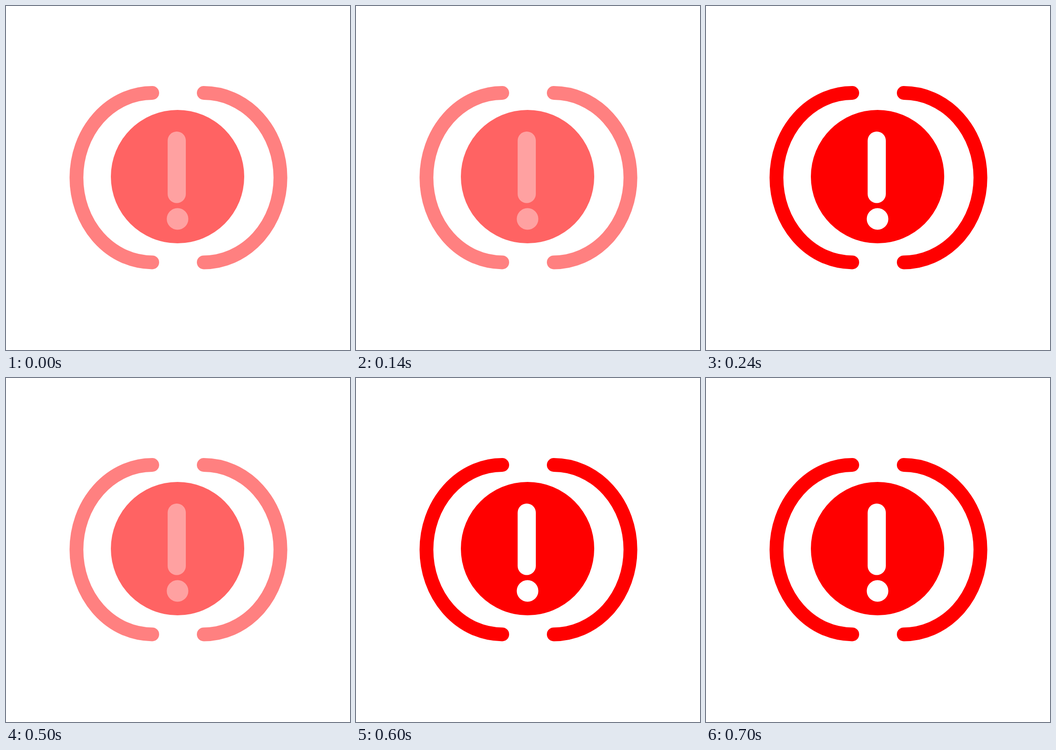
Write an HTML page that moves like this. It is 748x748 px and loops after 0.76 s.

```html
<!DOCTYPE html>
<html lang="en">
<head>
<meta charset="utf-8">
<title>Blinking warning light</title>
<style>
  html, body { margin: 0; width: 100%; height: 100%; overflow: hidden; background: #fff; }
  svg { display: block; width: 100%; height: 100%; }
  .arc { fill: none; stroke-width: 30; stroke-linecap: round; }
</style>
</head>
<body>
<svg viewBox="0 0 748 748">
  <g id="arcs" class="arc">
    <path d="M318 189A164.8 184.2 0 0 0 318 557.4"/>
    <path d="M430 189A166.7 184.2 0 0 1 430 557.4"/>
  </g>
  <circle id="disc" cx="373" cy="371" r="145"/>
  <g id="mark">
    <rect x="351.5" y="273" width="39.5" height="155.5" rx="19.75"/>
    <circle cx="373" cy="463" r="23.5"/>
  </g>
</svg>
<script>
  const LOOP = 760;
  // [start in ms, lit]
  const steps = [[0, 0], [240, 1], [360, 0], [600, 1], [LOOP, 1]];

  function blink(id, prop, dim, lit) {
    const frames = steps.map(([ms, on]) => ({
      offset: ms / LOOP,
      [prop]: on ? lit : dim,
      easing: 'step-end'
    }));
    const anim = document.getElementById(id)
      .animate(frames, { duration: LOOP, iterations: Infinity });
    anim.startTime = 0;
  }

  blink('arcs', 'stroke', '#ff8080', '#ff0000');
  blink('disc', 'fill', '#ff6363', '#ff0000');
  blink('mark', 'fill', '#ffa1a1', '#ffffff');
</script>
</body>
</html>
```
